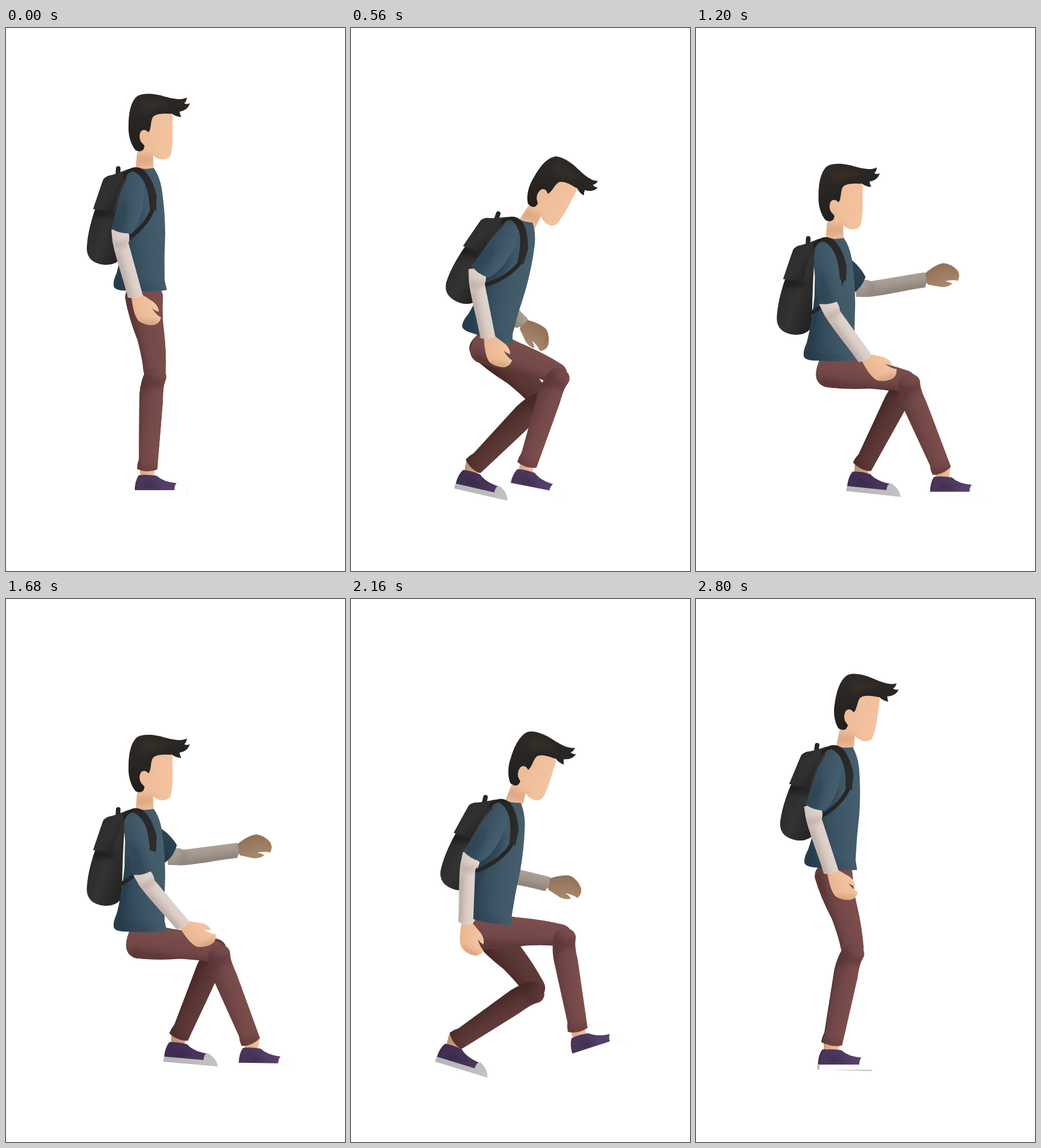
Recreate the animation shown at these times as an HTML page with a canvas. Size 592 by 947 pixels, loop 2.88 s.

```html
<!DOCTYPE html>
<html lang="en">
<head>
<meta charset="utf-8">
<title>Sitting down and standing up</title>
<style>
html, body { margin: 0; width: 100%; height: 100%; overflow: hidden; background: #fff; }
canvas { display: block; width: 592px; height: 947px; }
</style>
</head>
<body>
<canvas id="stage" width="592" height="947"></canvas>
<script>
const ctx = document.getElementById('stage').getContext('2d');
const STEP = 80, STEPS = 36;

// Joints of the upright figure; every part is drawn in this pose and then turned.
const JOINT = {
  pelvis: [240, 465], neck: [230, 282], shoulder: [222, 275], elbow: [201, 362],
  wrist: [228, 470], hip: [240, 475], knee: [259, 605], ankle: [246, 772]
};
const degrees = radians => radians * 180 / Math.PI;
const radians = degrees => degrees * Math.PI / 180;

// Angle of a limb from straight down, forward positive.
const limbAngle = (from, to) => degrees(Math.atan2(to[0] - from[0], to[1] - from[1]));
const distance = (a, b) => Math.hypot(b[0] - a[0], b[1] - a[1]);
const REST = {
  upper: limbAngle(JOINT.shoulder, JOINT.elbow), fore: limbAngle(JOINT.elbow, JOINT.wrist),
  thigh: limbAngle(JOINT.hip, JOINT.knee), shin: limbAngle(JOINT.knee, JOINT.ankle)
};
const THIGH = distance(JOINT.hip, JOINT.knee), SHIN = distance(JOINT.knee, JOINT.ankle);

// step: pelvis height, torso lean, head lean, arm angles [upper, fore], feet [ankle x, ankle y, tilt].
const seated = { y: 587, torso: 0, head: 0, near: [13, 39], far: [55, 96], nearFoot: [428, 775, 1], farFoot: [300, 766, 5] };
const KEYS = [
  [0, { y: 465, torso: 0, head: 0, near: [-13.6, 14], far: [-12, 14], nearFoot: [246, 772, 0], farFoot: [246, 772, 0] }],
  [4, { y: 517, torso: 20, head: 34, near: [-39, 19], far: [-36, 18], nearFoot: [262, 768, 7], farFoot: [216, 769, 12] }],
  [7, { y: 547.4, torso: 15.7, head: 28, near: [-36, 10], far: [-33, 43], nearFoot: [306, 764, 11], farFoot: [211, 766, 13] }],
  [11, { y: 586, torso: 3.2, head: 7.5, near: [-13.6, 11], far: [20, 107], nearFoot: [429, 765, -14], farFoot: [219, 770, 12] }],
  [12.5, { y: 588, torso: -6, head: -5, near: [-9, 17], far: [32, 107], nearFoot: [440, 770, -8], farFoot: [238, 771, 11] }],
  [14, { y: 587, torso: 0, head: 0, near: [0, 27], far: [44, 102], nearFoot: [433, 774, -2], farFoot: [268, 769, 8] }],
  [16, seated],
  [21, seated],
  [27, { y: 570, torso: 10, head: 17, near: [-31.5, -3.6], far: [-11, 75], nearFoot: [396, 754, -18], farFoot: [180, 772, 17] }],
  [31, { y: 523, torso: 20, head: 33, near: [-40, 27.5], far: [-40, 18], nearFoot: [241, 764, 14], farFoot: [191, 770, 30] }],
  [35, { y: 477.5, torso: 4, head: 8, near: [-19, 16.7], far: [-17, 17], nearFoot: [237, 778, 0], farFoot: [235, 778, 2] }]
].map(([step, p]) => [step, p.y, p.torso, p.head, ...p.near, ...p.far, ...p.nearFoot, ...p.farFoot]);

function key(i) {
  const n = KEYS.length, lap = Math.floor(i / n), row = KEYS[i - lap * n];
  return [row[0] + lap * STEPS, ...row.slice(1)];
}

// Monotone cubic interpolation: smooth, but still during holds.
function poseAt(step) {
  let i = 0;
  while (i + 1 < KEYS.length && KEYS[i + 1][0] <= step) i++;
  const rows = [key(i - 1), key(i), key(i + 1), key(i + 2)];
  const [, a, b] = rows, span = b[0] - a[0], u = (step - a[0]) / span;
  const slope = (c, k) => (rows[k + 1][c] - rows[k][c]) / (rows[k + 1][0] - rows[k][0]);
  const tangent = (p, q) => p * q <= 0 ? 0 : 2 * p * q / (p + q);
  return a.map((v, c) => {
    const d = slope(c, 1);
    const m0 = tangent(slope(c, 0), d) * span, m1 = tangent(d, slope(c, 2)) * span;
    const rise = b[c] - v;
    return v + u * (m0 + u * (3 * rise - 2 * m0 - m1 + u * (m0 + m1 - 2 * rise)));
  });
}

// A part: outline, gradient line and colours, and soft shades kept inside the outline.
function part(d, line, colors, shades = []) {
  const fill = ctx.createLinearGradient(...line);
  colors.forEach((c, i) => fill.addColorStop(i / (colors.length - 1), c));
  return { path: new Path2D(d), fill, shades: shades.map(([s, color]) => [new Path2D(s), color]) };
}

function paint({ path, fill, shades }) {
  ctx.fillStyle = fill;
  ctx.fill(path);
  if (!shades.length) return;
  ctx.save();
  ctx.clip(path);
  ctx.filter = 'blur(4px)';
  for (const [shade, color] of shades) {
    ctx.fillStyle = color;
    ctx.fill(shade);
  }
  ctx.restore();
}

const OUTLINE = {
  thigh: 'M208 470Q209 446 240 446Q272 446 274 468Q272 500 276 530Q280 565 279 598Q279 615 262 620Q244 618 240 598Q239 580 230 545Q214 505 208 470Z',
  shin: 'M244 598Q258 586 275 597Q283 606 278 616Q274 625 274 650Q270 700 264 770Q246 777 229 769Q229 760 232 752L233 640Q235 615 244 598Z',
  ankle: 'M234 762L261 762L258 786L235 786Z',
  shoe: 'M225 807Q225 790 232 780Q248 778 263 781Q275 792 298 794L296 808Z',
  sole: 'M225 806L294 806Q294 795 300 793Q316 800 320 815L224 815Z',
  fore: 'M184 352Q200 346 214 357Q217 366 214 375L239 466Q226 474 213 470Q208 450 200 425Q188 385 186 372Z',
  hand: 'M219 466L238 465L258 478Q267 486 267 495Q260 493 255 489Q262 500 271 505Q268 516 258 518Q243 519 232 511Q222 500 219 466Z',
  sleeve: 'M236 262Q222 245 211 262Q198 285 193 315Q188 338 184 350Q200 360 220 358Q238 335 240 300Q244 275 236 262Z'
};

function legParts(pants, sole, skin, shoe) {
  return {
    thigh: part(OUTLINE.thigh, [215, 530, 278, 520], pants, [['M205 460L222 460Q226 530 246 590L236 600Z', '#3b1f2045']]),
    shin: part(OUTLINE.shin, [231, 680, 274, 685], pants, [
      ['M240 598Q258 614 280 612L272 630Q254 622 236 636Z', '#3b1f2040'],
      ['M228 758Q246 766 266 760L264 776L228 774Z', '#3b1f2030']]),
    ankle: part(OUTLINE.ankle, [234, 0, 261, 0], skin),
    shoe: part(OUTLINE.shoe, [225, 0, 297, 0], shoe, [['M242 792Q256 790 270 802L246 804Z', '#2a1c3a60']]),
    sole: part(OUTLINE.sole, [224, 0, 320, 0], sole)
  };
}

function armParts(cloth, skin, sleeve) {
  return {
    fore: part(OUTLINE.fore, [192, 425, 228, 415], cloth, [
      ['M184 370Q200 378 215 366L214 376Q200 388 188 384Z', '#7a655a40'],
      ['M188 390L199 390L222 474L206 474Z', '#7a655a40']]),
    hand: part(OUTLINE.hand, [222, 500, 264, 485], skin, [['M234 508Q250 514 268 508L262 522L236 518Z', '#9c643c50']]),
    sleeve: part(OUTLINE.sleeve, [190, 300, 240, 305], sleeve, [['M184 346L204 300L216 310L206 360Z', '#21364550']])
  };
}

const nearLeg = legParts(['#623d3c', '#75494a', '#7d4f4b'], ['#fff', '#fdfdfd'], ['#dca27e', '#f2c4a2'], ['#473455', '#58416d']);
const farLeg = legParts(['#482a28', '#593633', '#623d3a'], ['#b5b5b5', '#c2c2c2'], ['#b8906f', '#d0a584'], ['#3f2d4f', '#4b375d']);
const nearArm = armParts(['#cfc1ba', '#e2d6cf'], ['#e8b48f', '#f4c6a3'], ['#34495a', '#466070']);
const farArm = armParts(['#90867d', '#aea398'], ['#8f7058', '#a98a6e'], ['#263b49', '#2e4453']);

const hair = part('M226 213C217 202 213 185 214 170C214 148 218 128 229 119C240 112 262 115 275 119C290 123 306 127 316 121Q315 129 311 131Q316 134 321 131Q318 143 303 146Q304 151 306 155Q297 155 289 149L260 170L250 212Q233 218 226 213Z',
  [225, 120, 250, 210], ['#2e2a27', '#211f1d'], [['M236 128Q262 122 290 134Q264 138 240 152Z', '#43382f70']]);
const face = part('M291 150Q262 147 256 156C252 164 254 176 249 182Q241 174 235 181Q231 190 236 199Q241 204 242 206L240 212Q235 217 229 214L225 264L258 258L257 222Q263 228 271 229Q282 230 287 223Q290 215 291 195Z',
  [235, 0, 291, 0], ['#edbb97', '#f3c3a0'], [['M222 222L258 220L260 238L222 240Z', '#c78f6a60']]);
const bag = part('M178 258Q192 255 214 246L206 290L204 330L202 400Q192 414 172 413Q142 410 141 385Q142 355 156 315Q160 290 170 264Z',
  [145, 340, 205, 360], ['#2b2b2b', '#333', '#242424'], [['M152 316L190 318L188 330L150 330Z', '#11111180']]);
const flap = part('M170 264Q175 257 186 257L214 246L196 285L187 318L152 316Q158 298 165 278Z',
  [160, 270, 205, 300], ['#2c2c2c', '#313131', '#222']);
const shirt = part('M224 243Q240 248 258 244Q268 258 272 280Q278 320 278 360Q276 400 277 440L281 457Q250 462 210 458Q190 458 188 450Q187 440 193 428Q202 395 207 345Q207 290 212 252Z',
  [195, 360, 280, 350], ['#2c4252', '#3d5565', '#475f6c'], [
    ['M236 300Q244 340 216 366L200 460L186 460L202 340Z', '#1f344460'],
    ['M200 446Q230 442 262 452L250 458L200 456Z', '#1f344440']]);
const strap = part('M205 254Q222 236 240 247Q256 262 263 292L262 319L251 316Q250 290 243 272Q235 255 222 250Q214 250 205 264Z',
  [206, 0, 262, 0], ['#202020', '#2d2d2d']);
const handle = new Path2D('M195 262L196 245');
const lowerStrap = new Path2D('M256 316Q244 349 203 374');

function moved(joint, pivot, at, turn) {
  const a = radians(turn), x = joint[0] - pivot[0], y = joint[1] - pivot[1];
  return [at[0] + x * Math.cos(a) - y * Math.sin(a), at[1] + x * Math.sin(a) + y * Math.cos(a)];
}

function drawAt(pivot, at, turn, draw, flip = 1) {
  ctx.save();
  ctx.translate(...at);
  ctx.rotate(radians(turn));
  ctx.scale(flip, 1);
  ctx.translate(-pivot[0], -pivot[1]);
  draw();
  ctx.restore();
}

function line(path, width) {
  ctx.strokeStyle = '#262626';
  ctx.lineWidth = width;
  ctx.lineCap = 'round';
  ctx.stroke(path);
}

// The foot is placed; the knee follows from the two bone lengths and bends forward.
function drawLeg(leg, hip, x, y, tilt) {
  const ankle = [x, y], reach = Math.min(distance(hip, ankle), THIGH + SHIN);
  const bend = Math.acos((THIGH ** 2 + reach ** 2 - SHIN ** 2) / (2 * THIGH * reach));
  const thigh = REST.thigh - limbAngle(hip, ankle) - degrees(bend);
  const knee = moved(JOINT.knee, JOINT.hip, hip, thigh);
  const shin = REST.shin - limbAngle(knee, ankle);
  drawAt(JOINT.ankle, ankle, tilt, () => [leg.ankle, leg.shoe, leg.sole].forEach(paint));
  drawAt(JOINT.hip, hip, thigh, () => paint(leg.thigh));
  drawAt(JOINT.knee, knee, shin, () => paint(leg.shin));
}

// The far hand is mirrored, so that its palm faces down when the arm reaches out.
function drawArm(arm, shoulder, upperAngle, foreAngle, isFar) {
  const upper = REST.upper - upperAngle, fore = REST.fore - foreAngle;
  const elbow = moved(JOINT.elbow, JOINT.shoulder, shoulder, upper);
  const wrist = moved(JOINT.wrist, JOINT.elbow, elbow, fore);
  drawAt(JOINT.wrist, wrist, isFar ? -foreAngle - 39 : fore, () => paint(arm.hand), isFar ? -1 : 1);
  drawAt(JOINT.elbow, elbow, fore, () => paint(arm.fore));
  drawAt(JOINT.shoulder, shoulder, upper, () => paint(arm.sleeve));
}

function drawFigure(step) {
  const [, y, torso, head, ...limbs] = poseAt(step);
  const pelvis = [JOINT.pelvis[0], y], hip = [JOINT.hip[0], y + 10];
  const onTorso = joint => moved(joint, JOINT.pelvis, pelvis, torso);
  const withTorso = draw => drawAt(JOINT.pelvis, pelvis, torso, draw);
  const shoulder = onTorso(JOINT.shoulder);

  ctx.fillStyle = '#fff';
  ctx.fillRect(0, 0, 592, 947);
  drawArm(farArm, shoulder, limbs[2], limbs[3], true);
  drawLeg(farLeg, hip, ...limbs.slice(7, 10));
  drawLeg(nearLeg, hip, ...limbs.slice(4, 7));
  drawAt(JOINT.neck, onTorso(JOINT.neck), head, () => [hair, face].forEach(paint));
  withTorso(() => {
    line(handle, 8);
    [bag, flap, shirt].forEach(paint);
    line(lowerStrap, 7);
  });
  drawArm(nearArm, shoulder, limbs[0], limbs[1], false);
  withTorso(() => paint(strap));
}

function frame() {
  drawFigure(Math.floor(performance.now() / STEP) % STEPS);
  requestAnimationFrame(frame);
}
frame();
</script>
</body>
</html>
```
